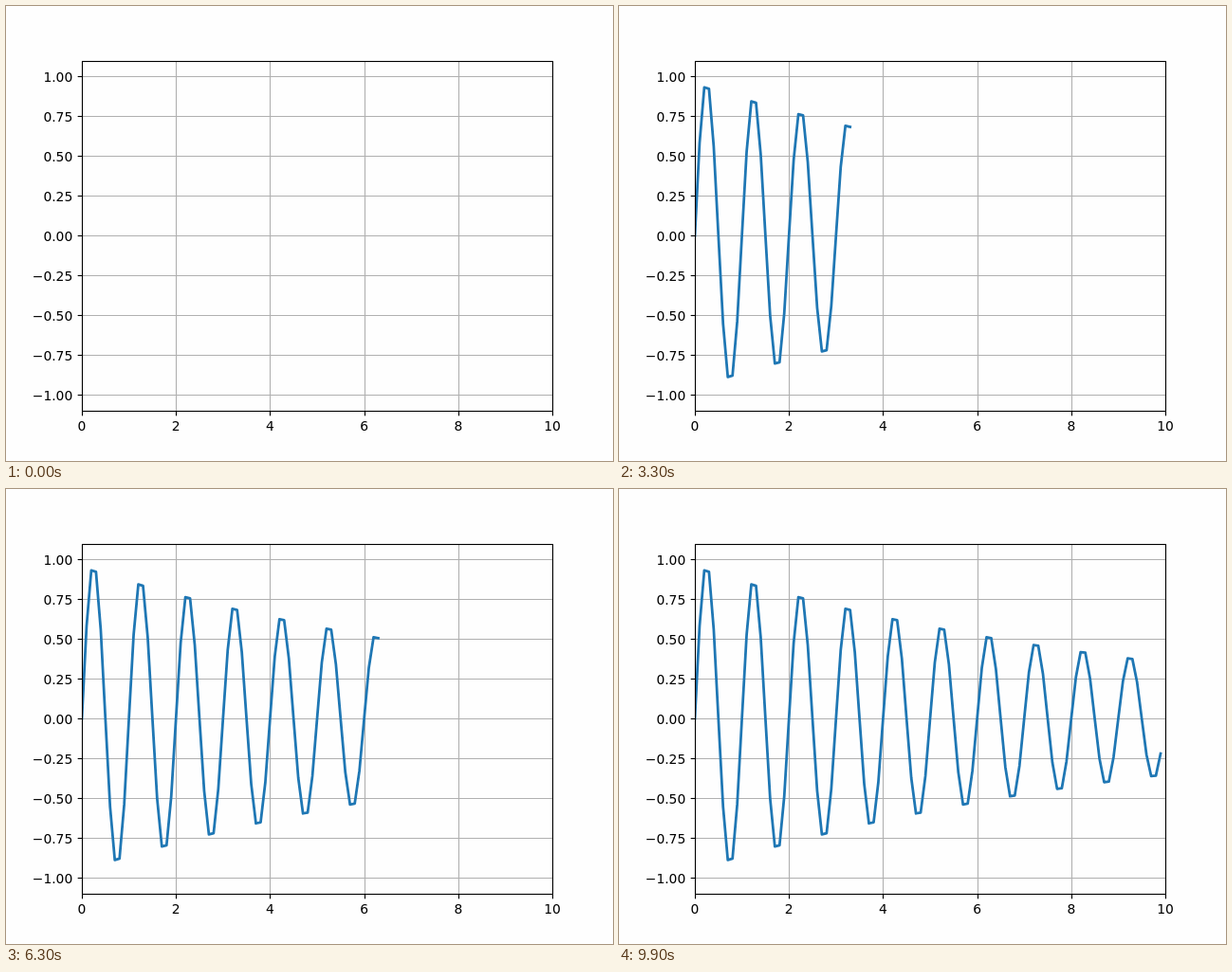
These frames come from a looping animation (640x480 px, 10000 ms). An HTML page with a canvas:

```html
<!DOCTYPE html>
<html lang="en">
<head>
<meta charset="utf-8">
<title>Damped sine</title>
<style>
  html, body { margin: 0; width: 100%; height: 100%; overflow: hidden; background: #fefefe; }
  canvas { display: block; }
</style>
</head>
<body>
<canvas id="stage" width="640" height="480"></canvas>
<script>
const ctx = document.getElementById('stage').getContext('2d');
const LEFT = 80, TOP = 57.6, WIDTH = 496, HEIGHT = 369.6;
const STEP = 100, STEPS = 100, HAIR = 1.11, TICK = 4.86;

const px = t => LEFT + t * WIDTH / 10;
const py = v => TOP + (1.1 - v) * HEIGHT / 2.2;
const snap = p => Math.floor(p + 0.5) + 0.5;
const wave = t => Math.exp(-t / 10) * Math.sin(2 * Math.PI * t);

const x0 = snap(LEFT), x1 = snap(LEFT + WIDTH);
const y0 = snap(TOP), y1 = snap(TOP + HEIGHT);
const xTicks = [0, 2, 4, 6, 8, 10];
const yTicks = Array.from({ length: 9 }, (_, i) => i / 4 - 1);

function segment(xa, ya, xb, yb, color) {
  ctx.strokeStyle = color;
  ctx.lineWidth = HAIR;
  ctx.lineCap = 'butt';
  ctx.beginPath();
  ctx.moveTo(xa, ya);
  ctx.lineTo(xb, yb);
  ctx.stroke();
}

function drawGrid() {
  for (const t of xTicks) segment(snap(px(t)), y0, snap(px(t)), y1, '#b0b0b0');
  for (const v of yTicks) segment(x0, snap(py(v)), x1, snap(py(v)), '#b0b0b0');
}

function drawCurve(n) {
  ctx.save();
  ctx.beginPath();
  ctx.rect(LEFT, TOP, WIDTH, HEIGHT);
  ctx.clip();
  ctx.beginPath();
  for (let i = 0; i <= n; i++) ctx.lineTo(px(i / 10), py(wave(i / 10)));
  ctx.strokeStyle = '#1f77b4';
  ctx.lineWidth = 2.78;
  ctx.lineJoin = 'round';
  ctx.lineCap = 'square';
  if (n > 0) ctx.stroke();
  ctx.restore();
}

function drawAxes() {
  ctx.fillStyle = '#000';
  ctx.font = '13.89px "DejaVu Sans", sans-serif';
  ctx.textAlign = 'center';
  for (const t of xTicks) {
    const x = snap(px(t));
    segment(x, y1, x, y1 + TICK, '#000');
    ctx.fillText(t, px(t), 448);
  }
  ctx.textAlign = 'right';
  for (const v of yTicks) {
    const y = snap(py(v));
    segment(x0, y, x0 - TICK, y, '#000');
    ctx.fillText(v.toFixed(2).replace('-', '\u2212'), 70.28, Math.round(py(v) + 5.28));
  }
  ctx.lineWidth = HAIR;
  ctx.strokeRect(x0, y0, x1 - x0, y1 - y0);
}

function draw() {
  const n = Math.floor(performance.now() / STEP) % STEPS;
  ctx.fillStyle = '#fefefe';
  ctx.fillRect(0, 0, 640, 480);
  drawGrid();
  drawCurve(n);
  drawAxes();
  requestAnimationFrame(draw);
}
draw();
</script>
</body>
</html>
```
